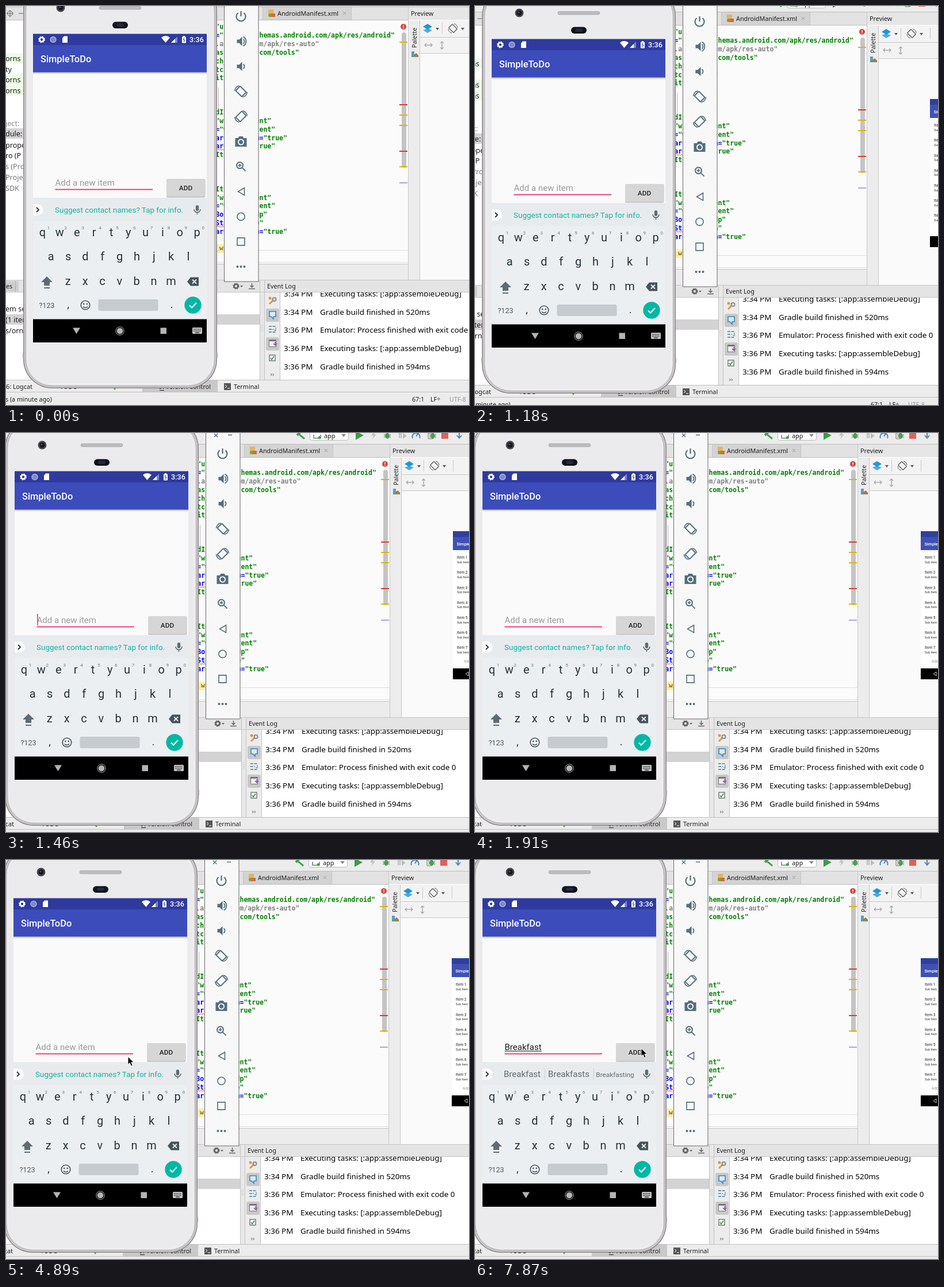
Write an HTML page that moves like this. It is 805 px wide and 695 px high and loops after 8 s.

```html
<!DOCTYPE html>
<html lang="en">
<head>
<meta charset="utf-8">
<title>To-do app in an emulator</title>
<style>
  html, body { margin: 0; width: 100%; height: 100%; overflow: hidden; background: #fff; }
  svg { display: block; width: 805px; height: 695px; }
  text { white-space: pre; font-family: "Noto Sans", "Open Sans", sans-serif; }
  .app text, .mini text { font-family: Roboto, sans-serif; }
  .code text { font: bold 11.5px "DejaVu Sans Mono", monospace; }
  .mid { text-anchor: middle; }
  .end { text-anchor: end; }
</style>
</head>
<body>
<svg id="stage" viewBox="0 0 805 695" xmlns="http://www.w3.org/2000/svg"></svg>
<script>
const rect = (x, y, w, h, fill, more = '') =>
  `<rect x="${x}" y="${y}" width="${w}" height="${h}" fill="${fill}" ${more}/>`;
const text = (x, y, s, size, fill = '#1c1c1c', more = '') =>
  `<text x="${x}" y="${y}" font-size="${size}" fill="${fill}" ${more}>${s}</text>`;
const circle = (x, y, r, fill, more = '') =>
  `<circle cx="${x}" cy="${y}" r="${r}" fill="${fill}" ${more}/>`;
const line = (d, stroke, w = 1, more = '') =>
  `<path d="${d}" fill="none" stroke="${stroke}" stroke-width="${w}" ${more}/>`;
const shape = (d, fill, more = '') => `<path d="${d}" fill="${fill}" ${more}/>`;
const at = (x, y, body) => `<g transform="translate(${x} ${y})">${body}</g>`;
const MID = 'class="mid"';

const gear = (r, c, hole) => circle(0, 0, r * .62, 'none', `stroke="${c}" stroke-width="${r * .5}"`) +
  circle(0, 0, r * .87, 'none', `stroke="${c}" stroke-width="${r * .3}" stroke-dasharray="${r * .36} ${r * .323}"`) +
  circle(0, 0, r * .3, hole);

// ---------- IDE ----------
function projectTree() {
  const rows = [[109, 'orns', 1], [128, 'ty'], [146, 'orns', 1], [165, 'orns', 1], [222, 'ject:', 0, '#8a8a8a'],
    [240, 'dule:', 2], [260, 'prope'], [278, 'ro (P'], [297, 's (Pro', 0, '#777'],
    [316, 'Proje', 0, '#777'], [335, 'SDK', 0, '#777']];
  return rows.map(([y, s, mark, c]) =>
    (mark ? rect(-40, y - 9, 50, 18, mark === 2 ? '#d4d4d4' : '#eefae6') : '') +
    text(-35, y + 4.5, s, 12.6, c)).join('');
}

function editor() {
  const rows = [
    [0, '<?xml version="1.0" encoding="utf-8"?>'],
    [1, '<RelativeLayout xmlns:android="http://schemas.android.com/apk/res/android"'],
    [2, '    xmlns:app="http://schemas.android.com/apk/res-auto"', '#808080'],
    [3, '    xmlns:tools="http://schemas.android.com/tools"'],
    [4, '    android:layout_width="match_parent"'],
    [5, '    android:layout_height="match_parent"'],
    [6, '    tools:context=".MainActivity">'],
    [10, '        android:id="@+id/btAddItem"'],
    [11, '        android:layout_width="wrap_content"'],
    [12, '        android:layout_height="wrap_content"'],
    [13, '        android:layout_alignParentBottom="true"'],
    [14, '        android:layout_alignParentEnd="true"', 0, 1],
    [15, '        android:onClick="saveItem" />'],
    [19, '        android:id="@+id/editItem"'],
    [20, '        android:layout_width="wrap_content"'],
    [21, '        android:layout_height="wrap_content"'],
    [22, '        android:layout_marginBottom="16dp"'],
    [23, '        android:layout_marginStart="16dp"', 0, 1],
    [24, '        android:layout_alignParentBottom="true"']];
  const esc = s => s.replace(/</g, '&lt;').replace(/>/g, '&gt;');
  const code = rows.map(([n, s, c, wavy]) => {
    const y = 58.2 + 14.87 * n, cut = s.lastIndexOf('="') + 1;
    return `<text x="129.5" y="${y}" fill="${c || '#008000'}"><tspan fill="${c || '#0000f0'}">` +
      `${esc(s.slice(0, cut))}</tspan>${esc(s.slice(cut))}</text>` +
      (wavy ? line(`M333 ${y + 3}l2-2 2 2 2-2 2 2 2-2 2 2 2-2`, '#f33') : '');
  }).join('');
  const marks = [[81, '#e0b400'], [190, '#d33a34'], [208, '#e0b400'], [226, '#e0b400'],
    [271, '#d33a34'], [298, '#e0b400'], [326, '#a9a4e8']];
  return rect(330, 43, 335, 424, '#fbfbfb') + line('M335.5 160v40', '#b5b5b5') +
    rect(333, 433, 13, 15, '#fbefa5') +
    `<g class="code">${code}<text x="337" y="444" fill="#8a6d1c">w</text></g>` +
    line('M333 443.5H665M333 464.5H665', '#dcdcdc') +
    rect(654, 64, 8, 236, '#c4c4c4', 'rx="4"') +
    marks.map(([y, c]) => rect(650, y - 1, 14, 2, c)).join('') +
    circle(657, 54, 5, '#d9443c') + rect(656.3, 51, 1.4, 3.6, '#fff') + rect(656.3, 55.6, 1.4, 1.5, '#fff') +
    rect(330, 467, 335, 28, '#ececec') + line('M333 467.5H665', '#c4c4c4');
}

function topBars() {
  const bug = (x, c) => at(x, 5, `<ellipse rx="3.6" ry="5" fill="${c}"/>` + line('M-6-3l12 6M-6 3l12-6M-6 0h12', c));
  return rect(-40, -30, 900, 50, '#ececec') + rect(-40, 19, 705, 24, '#e2e2e2') + rect(412, 19, 154, 23, '#d3d3d3') +
    line('M-40 19.5H845M-40 42.5H845', '#bdbdbd') + line('M412.5 20v22M566.5 20v22', '#c4c4c4') +
    circle(-27, 31, 4.5, 'none', 'stroke="#666"') + line('M-27 25v12M-33 31h12M-12 31h10', '#666') +
    rect(422, 24, 9, 13, '#e4b45a') + rect(426, 31, 8, 6, '#d36b35') + circle(425, 34, 3, '#7ba04a') +
    text(438, 34.5, 'AndroidManifest.xml', 10.8) + line('M552 28l5 5M557 28l-5 5', '#999') +
    line('M506 1l11 9', '#47a04b', 3) + line('M504 4l6-6', '#47a04b', 4) +
    rect(526.5, -8, 67, 20.5, '#fff', 'stroke="#b9b9b9" rx="3"') +
    line('M533 3v6h12V3', '#777', 1.5) + circle(543, 8, 2.5, '#47a04b') + text(551, 8.5, 'app', 10.8) +
    shape('M581 2h8l-4 5z', '#888') + shape('M606-3l14 7-14 8z', '#3d9b46') +
    shape('M638-4l-5 9h4l-2 6 7-9h-4l3-6z', '#c4c4c4') + bug(661, '#4b9b50') +
    line('M682-2v11M685-2v11', '#bbb', 2) + shape('M688 0l7 5-7 5z', '#bbb') +
    line('M705 9a6.5 6.5 0 1 1 12 0M711 6l4-6', '#4a88b5', 2) +
    line('M732 0h8v10h-8z', '#777') + bug(740, '#4b9b50') + rect(755, -2, 12, 12, '#e0605e') +
    line('M786-2v9M782 4l4 5 4-5', '#4a88b5', 2);
}

function preview() {
  const items = [1, 2, 3, 4, 5, 6, 7].map(n => {
    const y = 193 + 26.2 * n;
    return text(782, y, 'Item ' + n, 6.6, '#222') + text(782, y + 7.6, 'Sub Item ' + n, 5.4, '#333');
  }).join('');
  const caret = (x, y) => shape(`M${x - 3} ${y - 2}h6l-3 4z`, '#555');
  return rect(665, 20, 180, 475, '#fff') + rect(665, 20, 180, 22, '#e6e6e6') + text(670, 34.5, 'Preview', 10.8) +
    rect(665, 43, 20, 452, '#ececec') + rect(685, 43, 160, 57, '#f3f3f3') + rect(685, 101, 160, 394, '#fafafa') +
    line('M665.5 20V495M685.5 43V495M685 72.5H845M685 100.5H845M724.5 47v20M775.5 47v20', '#c8c8c8') +
    text(0, 0, 'Palette', 10.8, '#222', 'transform="translate(680 91) rotate(-90)"') +
    rect(671, 97, 5, 7, '#5b9bd0') + shape('M671 107l8-7 4 4v3z', '#cf5a50') + rect(671, 104, 11, 3, '#5ca268') +
    shape('M691 60l8 5 8-5-8-3z', '#52a9dc') + shape('M691 54l8-5 8 5-8 5z', '#2196d8') + caret(716, 58) +
    at(743, 57, rect(-4.5, -6, 9, 12, 'none', 'stroke="#555" stroke-width="1.3" rx="1" transform="rotate(-45)"') +
      line('M-8 1a8 8 0 0 0 6 7M8-1a8 8 0 0 0-6-7', '#555')) + caret(760, 58) +
    line('M694 86h13M697 83l-3 3 3 3M704 83l3 3-3 3M724 80v13M721 83l3-3 3 3M721 90l3 3 3-3', '#aaa', 1.4) +
    `<g class="mini">` + rect(775, 171, 80, 10, '#303f9f') + rect(775, 181, 80, 23, '#3f51b5') +
    rect(775, 204, 80, 206, '#fff') + text(781.5, 195.5, 'SimpleToDo', 7.6, '#fff', 'font-weight="500"') +
    items + text(794, 399.5, 'Add a new item', 6.8, '#999') + rect(775, 410, 80, 19, '#000') +
    line('M802 416v7l-5-3.5z', '#ccc') + '</g>';
}

function lowerPanels() {
  const log = [['3:34', 'Executing tasks: [:app:assembleDebug]'], ['3:34', 'Gradle build finished in 520ms'],
    ['3:36', 'Emulator: Process finished with exit code 0'], ['3:36', 'Executing tasks: [:app:assembleDebug]'],
    ['3:36', 'Gradle build finished in 594ms']];
  const rows = log.map(([h, s], i) => {
    const y = 523.8 + 31.7 * i;
    return text(449, y, h + ' PM', 13.4, '#000') + text(512, y, s, 13.4, '#000');
  }).join('');
  return rect(-40, 495, 900, 21, '#e4e4e4') + rect(-40, 516, 447, 153, '#fff') + rect(-40, 555, 447, 18, '#d3d3d3') +
    rect(-40, 497, 28, 18, '#cfcfcf') + text(-34, 510, 'es', 10.8) + line('M-17.5 497v19', '#aaa') +
    text(-35, 550, 'em se', 12.6) + text(-35, 568.5, '(1 item', 12.6) + text(-35, 588, 's/orn', 12.6) +
    at(366, 506, gear(5.5, '#666', '#e4e4e4')) + shape('M373 505h5l-2.5 3z', '#666') +
    line('M388 510.5h11M393.5 501v7M390.5 505l3 3 3-3', '#666', 1.5) +
    rect(407, 495, 8, 174, '#e8e8e8') + line('M407.5 495V669M415.5 495V669', '#c2c2c2') +
    line('M410 574v12M412.5 574v12', '#aaa', 1, 'stroke-dasharray="1 2"') +
    rect(442, 516, 400, 153, '#fff') + `<clipPath id="log"><path d="M442 516h400v153h-400z"/></clipPath>` +
    `<g clip-path="url(#log)">${rows}</g>` + rect(416, 516, 26, 153, '#ececec') +
    line('M-40 495.5H845M-40 516.5H845M442.5 516V669', '#c4c4c4') + text(420, 510, 'Event Log', 10.8) +
    line('M424 537l7-7', '#d49a43', 3) + circle(432.5, 529, 3, 'none', 'stroke="#8c8c8c" stroke-width="2"') +
    circle(425, 527, 2.5, '#d49a43') +
    rect(418, 545, 23, 23, '#c8c8c8', 'rx="3"') + rect(418, 595, 23, 23, '#c8c8c8', 'rx="3"') +
    shape('M424 550h11v9h-4v4l-4-4h-3z', '#d7ebf8', 'stroke="#3c87bd" stroke-width="1.6"') +
    line('M423 576h12M423 581h8M423 586h12', '#477fa4', 1.7, 'stroke-dasharray="5 1.5"') +
    line('M435 578v6l-3-2', '#477fa4') +
    rect(423.5, 599.5, 12, 12, '#eee', 'stroke="#777"') + rect(423, 599, 13, 3, '#777') +
    line('M434 603v6M431 606l3 3 3-3', '#8b4ba0', 1.5) +
    rect(424, 626, 10, 10, '#fff', 'stroke="#666" stroke-width="1.3"') + line('M426 631l2 3 4-6', '#3b9c45', 1.7) +
    text(429, 663, '››', 11, '#555', MID) +
    rect(-40, 669, 900, 21, '#ececec') + rect(203, 669, 131, 21, '#c9c9c9') + rect(-40, 690, 900, 30, '#ececec') +
    line('M-40 669.5H845M-40 690.5H845', '#c0c0c0') +
    text(-34, 685, '6: Logcat', 10.8) + text(60, 685, 'TODO', 10.8) + shape('M150 680h10l-5 7z', '#5ba63b') +
    text(322, 685, '9: Version Control', 10.8, '#222', 'class="end"') + line('M233 687.5h8', '#222') +
    rect(345, 675, 12, 12, '#555') + line('M347 678l3 2.5-3 2.5M351 684h4', '#fff') + text(362, 685, 'Terminal', 10.8) +
    text(-35, 707, 's (a minute ago)', 10.7) + text(672, 707, '67:1', 10.7) + text(704, 707, 'LF÷', 10.7) +
    text(737, 707, 'UTF-8', 10.7, '#999');
}

// ---------- Emulator ----------
function controls() {
  const c = '#546e7a', wide = (d, w = 2) => line(d, c, w);
  const speaker = shape('M-7-3h4l5-5V8l-5-5h-4z', c);
  const turn = rect(-5.5, -7.5, 11, 15, 'none', `stroke="${c}" stroke-width="2" rx="1" transform="rotate(-45)"`) +
    wide('M-11-1a11 11 0 0 1 8-9M11 1a11 11 0 0 1-8 9', 1.6);
  const icons = [
    wide('M-5-6a8 8 0 1 0 10 0M0-9v9', 2.2),
    speaker + wide('M4-4a5 5 0 0 1 0 8M4-8a9 9 0 0 1 0 16', 1.8),
    speaker + wide('M4-4a5 5 0 0 1 0 8', 1.8),
    turn, `<g transform="scale(-1 1)">${turn}</g>`,
    shape('M-10-6h5l2-3h6l2 3h5V9h-20z', c) + circle(0, 1, 4.6, 'none', 'stroke="#fff" stroke-width="1.8"'),
    circle(-2, -2, 5.5, 'none', `stroke="${c}" stroke-width="2"`) + wide('M2 2l6 6M-5-2h6M-2-5v6', 1.8),
    wide('M6-6.5v13l-11-6.5z', 1.6), circle(0, 0, 6.6, 'none', `stroke="${c}" stroke-width="1.6"`),
    wide('M-6.5-6.5h13v13h-13z', 1.6), [-6, 0, 6].map(x => circle(x, 0, 2, c)).join('')];
  return `<pattern id="weave" width="4" height="4" patternUnits="userSpaceOnUse">${rect(0, 0, 4, 4, '#fafafa')}` +
    line('M0 4L4 0', '#f0f0f0') + '</pattern>' +
    rect(345.5, -40, 59.5, 538, 'url(#weave)', 'stroke="#686868"') +
    line('M360 1l6 6M366 1l-6 6M384 3.5h7', '#546e7a', 1.3) +
    icons.map((s, i) => at(374.5, 36 + 43.6 * i, s)).join('');
}

function keyboard() {
  const ink = '#263238';
  const row = (keys, x, y, nums) => [...keys].map((k, i) =>
    text(x + 29.85 * i, y, k, 20, ink, MID) +
    (nums ? text(x + 10.5 + 29.85 * i, 407, (i + 1) % 10, 8, '#68757c', MID) : '')).join('');
  return rect(13, 352, 302, 212, '#eceff1') + rect(13, 352, 302, 40, '#e8ebed') +
    shape('M13 363h8a10 10 0 0 1 0 20h-8z', '#fafafa') + line('M19 369l4 4-4 4', ink, 1.8) +
    rect(295.8, 365, 5.4, 10, '#5f6b73', 'rx="2.7"') + line('M293 372a5.5 5.5 0 0 0 11 0M298.5 377v4', '#5f6b73', 1.6) +
    row('qwertyuiop', 29.5, 418.5, true) + row('asdfghjkl', 44.2, 461) + row('zxcvbnm', 73.8, 504) +
    shape('M37 489l10 10h-5v6H32v-6h-5z', '#5f6b73') + rect(32, 508, 10, 2, '#5f6b73') +
    shape('M281 498l6-7.5h14v15h-14z', '#46535a') + line('M290 494.5l7 7M297 494.5l-7 7', '#eceff1', 1.8) +
    text(37, 544, '?123', 12.6, '#4b5960', MID) + text(74, 544, ',', 18, ink, MID) + text(254, 544, '.', 18, ink, MID) +
    circle(104, 539, 7.8, 'none', 'stroke="#46535a" stroke-width="1.6"') +
    circle(101.2, 537, 1.3, '#46535a') + circle(106.8, 537, 1.3, '#46535a') +
    line('M100 541.5a4.5 3.5 0 0 0 8 0', '#46535a', 1.5) +
    rect(126.5, 529, 104, 20, '#c6cbd0', 'rx="3"') + circle(291, 539, 14.7, '#00b8a5') +
    line('M285 539.5l4 4 8-8.5', '#fff', 2);
}

function phone() {
  const body = (d, fill, more) => rect(-4 + d, -24 + d, 337 - 2 * d, 708 - 2 * d, fill, `rx="${50 - d}" ${more || ''}`);
  const w = '#fff';
  return body(0, '#8c8588') + body(1.5, '#cfcdd0') + body(4, '#dedde0', 'stroke="#a8a2a5"') +
    body(7, '#ebebee', 'stroke="#f8f8f8"') +
    rect(-5, 622, 3, 9, '#aaa') + rect(331, 622, 3, 9, '#aaa') +
    circle(61, 21, 7.5, '#4a4a4f') + circle(61, 21, 4.8, '#17181d') + circle(60, 20, 1.6, '#4a5570') +
    rect(128, 18.5, 73, 5.5, '#bcbcbf', 'rx="2.7" stroke="#a5a5a8" stroke-width=".7"') +
    rect(151, 45.5, 27, 11.5, '#111218', 'rx="5.7"') + rect(158, 48, 13, 6, '#23263f', 'rx="3"') +
    '<g class="app">' +
    rect(13, 133, 302, 219, '#fafafa') + rect(13, 133, 302, 3, '#d6d6d8') + rect(13, 86, 302, 47.5, '#3c4cba') +
    rect(13, 66.5, 302, 19.5, '#2e3a9e') +
    at(28, 76.5, gear(5.8, w, '#2e3a9e')) + circle(48, 76.5, 5, '#8088cc', 'stroke="#a9aee0" stroke-width="1.5"') +
    shape('M67 70.5h6v11.5h-9v-8z', w) + shape('M236 73a11 11 0 0 1 15 0l-7.5 9z', w) +
    shape('M264 71v11h-11z', '#7e88c9') + shape('M260 75v7h-7z', w) +
    rect(272, 71.5, 7, 11, w, 'rx="1"') + rect(274, 70, 3, 2, w) + line('M276 73l-2 4h3l-2 4', '#2e3a9e') +
    text(285, 81.2, '3:36', 12.6, w, 'font-weight="500"') +
    text(26, 116, 'SimpleToDo', 16.4, w, 'font-weight="500"') +
    rect(51.5, 336.6, 169.5, 2, '#f0407f') +
    rect(245, 320, 67.5, 31.5, '#bdbdbd', 'rx="2"') + rect(245, 319, 67.5, 31, '#d6d6d7', 'rx="2"') +
    text(278.5, 339.2, 'ADD', 11.8, '#222', 'class="mid" font-weight="500"') +
    keyboard() + rect(13, 563.5, 302, 40.5, '#000') +
    shape('M82 578.5h13l-6.5 10.5z', '#b5b5b5') + circle(164, 584, 5.3, '#b5b5b5') +
    circle(164, 584, 7.2, 'none', 'stroke="#b5b5b5"') + rect(234.5, 578.5, 10.5, 10.5, '#b5b5b5') +
    rect(290, 578, 17, 11, '#c4c4c4', 'rx="1.5"') +
    line('M292 581h13M292 584h13', '#222', 1.4, 'stroke-dasharray="1.5 1.2"') + line('M295 587h7', '#222', 1.3) +
    text(51.5, 331, 'Add a new item', 15.05, '#9b9b9b', 'id="hint"') +
    text(51, 378, 'Suggest contact names? Tap for info.', 13.44, '#12b3a4', 'id="tip"') +
    text(51.5, 331, '', 15.05, '#222', 'id="typed"') + rect(51.5, 332.4, 0, 1.1, '#222', 'id="under"') +
    rect(52, 315, 1.7, 20, '#f0407f', 'id="caret"') +
    '<g id="words">' + line('M121 363v20M206 363v20', '#cdd3d6') +
    [82, 163, 243.5].map(x => text(x, 378.3, '', 15, '#5f6b73', MID)).join('') + '</g></g>';
}

const stage = document.getElementById('stage');
stage.innerHTML = '<g id="world">' + rect(-40, -30, 900, 760, '#fff') + projectTree() + topBars() + editor() +
  preview() + lowerPanels() + phone() + controls() + '</g>' +
  '<g id="mouse">' + shape('M0 0v14l3.2-3 2.3 5.5 2.6-1.1-2.3-5.3h4.4z', '#000', 'stroke="#fff"') + '</g>';

// ---------- Motion: each table holds [start, values...] ----------
const pan = [[0, 34, -18], [880, 22, -12], [1030, 19, -10.5], [1180, 16, -9], [1320, 8, -4], [1460, 2, 0], [1610, 0, 0]];
const blink = [[0, 0], [440, 1], [880, 0], [1460, 1], [1910, 0], [2360, 1], [2810, 0], [3330, 1], [3840, 0],
  [4290, 1], [4890, 0], [5330, 1], [5780, 0], [6080, 1], [7570, 0]];
const pointer = [[0, -50, 0], [2060, 196, 28], [2210, 197, 29], [2810, 198, 60], [2960, 201, 122], [3110, 204.5, 182],
  [3250, 212, 250], [3400, 218, 310], [3550, 220, 343], [3700, 216, 343], [3840, 212, 342.5],
  [7570, 250, 336], [7720, 293, 330], [7870, 289, 328]];
const typing = [[0, ''], [6080, 'B', 'B', 'Be', 'But'], [6230, 'Bre', 'Bre', 'Break', 'Bread'],
  [6380, 'Brea', 'Brea', 'Break', 'Breakfast'], [6520, 'Break', 'Break', 'Breakfast', 'Breaking'],
  [6820, 'Breakf', 'Breakf', 'Breakfast', 'Breakfasts'], [6970, 'Breakfas', 'Breakfas', 'Breakfast', 'Breakfasts'],
  [7120, 'Breakfast', 'Breakfast', 'Breakfasts', 'Breakfasting']];

const [world, mouse, hint, tip, typed, under, caret, words] =
  ['world', 'mouse', 'hint', 'tip', 'typed', 'under', 'caret', 'words'].map(id => document.getElementById(id));
const slots = [...words.querySelectorAll('text')];
const pick = (table, t) => table.findLast(step => step[0] <= t).slice(1);
const show = (el, on) => el.setAttribute('visibility', on ? 'visible' : 'hidden');
const move = (el, [x, y]) => el.setAttribute('transform', `translate(${x} ${y})`);
let shown = null;

function type([word, ...offers]) {
  if (word === shown) return;
  shown = word;
  typed.textContent = word;
  const w = word ? typed.getComputedTextLength() : 0;
  under.setAttribute('width', w);
  caret.setAttribute('x', 52 + (w ? w - .7 : 0));
  show(hint, !word);
  show(tip, !word);
  show(words, word);
  slots.forEach((slot, i) => {
    slot.textContent = offers[i] || '';
    slot.setAttribute('font-size', slot.textContent.length > 10 ? 11.8 : 15);
  });
}

function draw(now) {
  const t = now % 8000;
  move(world, pick(pan, t));
  move(mouse, pick(pointer, t));
  type(pick(typing, t));
  show(caret, pick(blink, t)[0]);
  requestAnimationFrame(draw);
}
draw(0);
</script>
</body>
</html>
```
